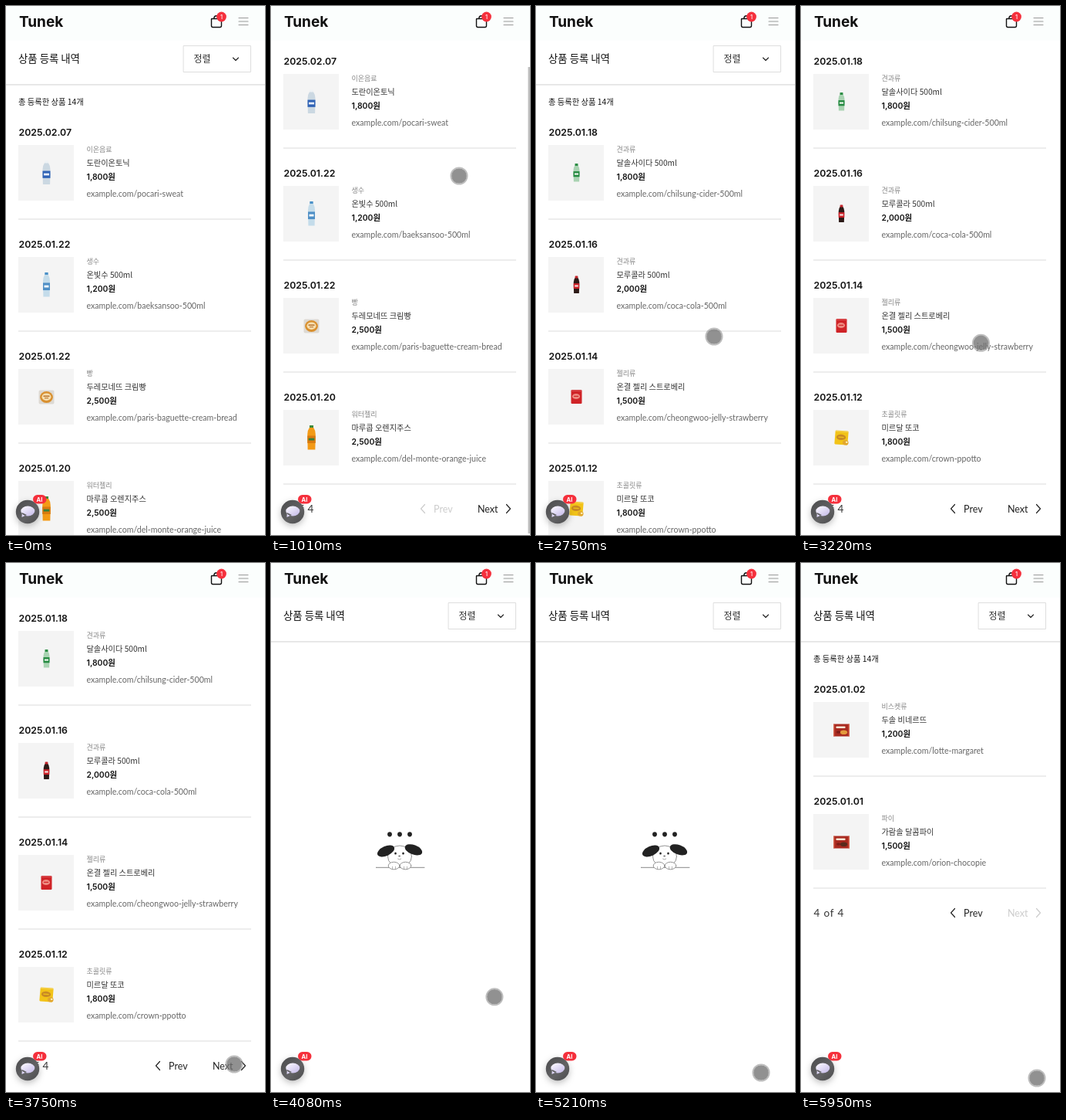
Write an HTML page with a canvas that moves like this. It is 336 by 685 pixels and loops after 6340 ms.

```html
<!DOCTYPE html>
<html lang="ko">
<head>
<meta charset="utf-8">
<title>상품 등록 내역</title>
<style>
  html, body { margin: 0; width: 336px; height: 685px; overflow: hidden; background: #fff; }
  canvas { display: block; width: 336px; height: 685px; }
</style>
</head>
<body>
<canvas id="stage"></canvas>
<script>
const W = 336, H = 685, LOOP = 6340, MAX_SCROLL = 92;
const canvas = document.getElementById('stage');
const ctx = canvas.getContext('2d');
const ratio = window.devicePixelRatio || 1;
canvas.width = W * ratio;
canvas.height = H * ratio;

const KR = '"Noto Sans CJK KR", "Noto Sans CJK", sans-serif';
const FONT = {
  ko: KR,
  num: `Inter, ${KR}`,
  latin: `Lato, ${KR}`
};

// ---------- drawing helpers ----------
function text(str, x, y, size, family, color, weight = 400, spacing = 0) {
  ctx.font = `${weight} ${size}px ${family}`;
  ctx.letterSpacing = `${spacing}px`;
  ctx.fillStyle = color;
  ctx.fillText(str, x, y);
}
function rect(x, y, w, h, color, r = 0) {
  ctx.fillStyle = color;
  ctx.beginPath();
  ctx.roundRect(x, y, w, h, r);
  ctx.fill();
}
function oval(x, y, rx, ry, fill, stroke, width = 1, turn = 0) {
  ctx.beginPath();
  ctx.ellipse(x, y, rx, ry, turn, 0, Math.PI * 2);
  if (fill) { ctx.fillStyle = fill; ctx.fill(); }
  if (stroke) { ctx.strokeStyle = stroke; ctx.lineWidth = width; ctx.stroke(); }
}
function line(points, color, width) {
  ctx.beginPath();
  points.forEach(([x, y]) => ctx.lineTo(x, y));
  ctx.strokeStyle = color;
  ctx.lineWidth = width;
  ctx.stroke();
}

// ---------- product pictures, centred on 0,0 ----------
const bottle = (w, h, cap, body, label, mark) => () => {
  const top = -h / 2, neck = w * 0.42;
  ctx.fillStyle = body;
  ctx.beginPath();
  ctx.moveTo(-neck / 2, top + 2);
  ctx.lineTo(neck / 2, top + 2);
  ctx.quadraticCurveTo(w / 2, top + h * 0.2, w / 2, top + h * 0.36);
  ctx.lineTo(w / 2 - 0.4, h / 2 - 0.5);
  ctx.lineTo(0.4 - w / 2, h / 2 - 0.5);
  ctx.lineTo(-w / 2, top + h * 0.36);
  ctx.quadraticCurveTo(-w / 2, top + h * 0.2, -neck / 2, top + 2);
  ctx.fill();
  rect(-neck / 2 - 0.3, top, neck + 0.6, 3, cap, 0.6);
  rect(-w / 2, top + h * 0.42, w, h * 0.3, label);
  rect(-w / 2 + 1.5, top + h * 0.52, w - 3, h * 0.09, mark);
};
const pack = (w, h, color, mark, tilt = 0, bite = '') => () => {
  ctx.rotate(tilt);
  rect(-w / 2, -h / 2, w, h, color, 1.2);
  rect(-w / 2 + 0.5, -h / 2 + 0.6, w - 1, 1, 'rgba(255,255,255,.3)');
  oval(-0.5, -0.5, w * 0.36, h * 0.2, mark);
  rect(-w * 0.24, -1.2, w * 0.42, 1.2, color);
  if (bite) {
    oval(w * 0.34, h * 0.33, 3.8, 3.2, bite);
    oval(w * 0.42, h * 0.3, 1.4, 1.1, '#fff2b8');
  }
};
const bun = () => {
  rect(-10, -8.5, 20, 18, '#ddd9d3', 2);
  oval(0, 0.5, 8.4, 7.6, '#d9902f');
  oval(0, 0.2, 6, 4.8, '#f6dfb0');
  rect(-4, -1.5, 8, 1.4, '#b46a22');
  rect(-2.5, 1.2, 5, 1, '#b46a22');
};
const choco = () => {
  rect(-10, -9, 20, 17, '#b98545', 1.5);
  rect(-8, -7, 16, 6, '#f3e4c4', 1);
  rect(-5, -5, 10, 1.4, '#6b4019');
  for (const x of [-5, 1, 6]) oval(x, 4.5, 3.3, 3.3, x === 1 ? '#8a5524' : '#6f411b');
};
const wafer = inner => () => {
  rect(-10.5, -7.5, 21, 16, '#a92a20', 1);
  rect(-10.5, -7.5, 1.4, 16, '#d96a52');
  rect(9.1, -7.5, 1.4, 16, '#d96a52');
  rect(-7, -4.5, 12, 2.6, '#f6e3d2', 0.8);
  oval(3, 3.2, 4.6, 2.8, inner);
  oval(-4, 3, 2.6, 1.8, '#7c1d17');
};

// ---------- listing: date, kind, name, price, address, picture ----------
const pages = [
  [
    ['2025.02.07', '이온음료', '도란이온토닉', '1,800원', 'pocari-sweat', bottle(10, 31, '#eef2f5', '#cbd8e2', '#2f62b5', '#e8eefa')],
    ['2025.01.22', '생수', '온빛수 500ml', '1,200원', 'baeksansoo-500ml', bottle(9, 32, '#4a90c8', '#c4dcea', '#4f8fc6', '#f2f8fc')],
    ['2025.01.22', '빵', '두레모네뜨 크림빵', '2,500원', 'paris-baguette-cream-bread', bun],
    ['2025.01.20', '워터젤리', '마루콥 오렌지주스', '2,500원', 'del-monte-orange-juice', bottle(10.5, 32, '#3c8a3a', '#f39a16', '#d97a10', '#35803a')]
  ],
  [
    ['2025.01.18', '견과류', '달솔사이다 500ml', '1,800원', 'chilsung-cider-500ml', bottle(8, 24, '#2d8d45', '#a9d3b2', '#258a41', '#f0f7ee')],
    ['2025.01.16', '견과류', '모루콜라 500ml', '2,000원', 'coca-cola-500ml', bottle(7.5, 23, '#c4232a', '#2c1a17', '#cc2128', '#f5e9e6')],
    ['2025.01.14', '젤리류', '온결 젤리 스트로베리', '1,500원', 'cheongwoo-jelly-strawberry', pack(14, 18, '#cf2327', '#ee8a80')],
    ['2025.01.12', '초콜릿류', '미르달 또코', '1,800원', 'crown-ppotto', pack(17, 18, '#f2c318', '#c98a24', 0.08, '#e2a72f')]
  ],
  [
    ['2025.01.10', '과자', '가람솔 바다콩', '900원', 'orion-goraebap', pack(17, 20, '#edb51c', '#3f8fc0', 0.05, '#d9a52c')],
    ['2025.01.08', '초콜릿류', '벨모나떼르', '1,200원', 'ferrero-rocher', choco],
    ['2025.01.06', '초콜릿류', '두솔 퐁쪼', '1,000원', 'lotte-kancho', pack(16, 20, '#d3224f', '#f2b9c4', -0.06, '#e9b23a')],
    ['2025.01.04', '과자', '나루 슈몽볼', '2,500원', 'haetae-homerunball', pack(16, 20, '#efbe1c', '#6f5620', -0.05, '#e0a238')]
  ],
  [
    ['2025.01.02', '비스켓류', '두솔 비네르뜨', '1,200원', 'lotte-margaret', wafer('#e39a3c')],
    ['2025.01.01', '파이', '가람솔 달콤파이', '1,500원', 'orion-chocopie', wafer('#5a2c1d')]
  ]
];

function item([date, kind, name, price, slug, art], y) {
  text(date, 16.5, y + 5, 12.3, FONT.num, '#111', 600);
  rect(16, y + 17, 72, 72, '#f4f4f4');
  ctx.save();
  ctx.translate(52.5, y + 53);
  art();
  ctx.restore();
  text(kind, 104.5, y + 26.3, 9, FONT.ko, '#888');
  text(name, 104.5, y + 44, 10.2, FONT.ko, '#333');
  text(price, 104.5, y + 62, 10.4, FONT.num, '#111', 600);
  text('example.com/' + slug, 104.5, y + 84, 10.6, FONT.latin, '#666');
  rect(16, y + 112.2, 302, 1.5, '#e7e7e7');
}

function pager(page, y) {
  const back = page > 0 ? '#222' : '#ccc';
  const next = page < 3 ? '#222' : '#ccc';
  text(`${page + 1} of 4`, 16.5, y + 4.8, 13.5, FONT.latin, '#333', 400, 0.8);
  line([[199.5, y - 5.5], [194.5, y], [199.5, y + 5.5]], back, 1.2);
  text('Prev', 211, y + 4.8, 12.5, FONT.latin, back);
  text('Next', 268, y + 4.8, 12.5, FONT.latin, next);
  line([[305.5, y - 5.5], [310.5, y], [305.5, y + 5.5]], next, 1.2);
}

function heading() {
  text('상품 등록 내역', 16, 73, 13.4, FONT.ko, '#111', 500);
  ctx.strokeStyle = '#dedede';
  ctx.lineWidth = 1;
  ctx.strokeRect(230.5, 51.5, 87, 34);
  text('정렬', 243.5, 73, 12, FONT.ko, '#333');
  line([[294.5, 67], [298, 70.5], [301.5, 67]], '#222', 1.1);
  rect(0, 101, W, 1.7, '#e4e4e4');
}

function list(page) {
  text('총 등록한 상품 14개', 16, 128, 10.3, FONT.ko, '#111', 500);
  pages[page].forEach((entry, i) => item(entry, 163 + i * 145));
  pager(page, 163 + pages[page].length * 145);
}

function puppy() {
  for (const x of [154, 167, 180]) oval(x, 351.3, 2.9, 3.1, '#222');
  line([[136, 394.3], [199, 394.3]], '#888', 1);
  oval(167, 380, 15.5, 14, '#fff', '#888', 0.9);
  oval(149, 373, 11.8, 6.2, '#222', null, 0, -0.42);
  oval(185, 371.3, 11.8, 6.2, '#222', null, 0, 0.36);
  oval(161.5, 376, 1.3, 1.6, '#222');
  oval(171.5, 376, 1.3, 1.6, '#222');
  oval(166.6, 379.5, 1.4, 0.9, '#777');
  line([[164.5, 383], [166.6, 384], [168.7, 383]], '#999', 0.8);
  for (const x of [159.5, 174.5]) {
    oval(x, 392, 7.3, 4.8, '#fff', '#888', 0.9);
    line([[x - 2, 393], [x - 2, 396]], '#999', 0.7);
    line([[x + 2, 393], [x + 2, 396]], '#999', 0.7);
  }
}

function header() {
  rect(0, 0, W, 44.5, '#fbfefd');
  text('Tunek', 17, 27, 19, FONT.num, '#111', 700);
  ctx.strokeStyle = '#111';
  ctx.lineWidth = 1.4;
  ctx.beginPath();
  ctx.roundRect(266.5, 16.5, 13, 11, [0.5, 0.5, 2, 2]);
  ctx.moveTo(269.8, 16.5);
  ctx.bezierCurveTo(269.8, 11.5, 276.2, 11.5, 276.2, 16.5);
  ctx.stroke();
  oval(279.5, 14, 6.4, 6.4, '#f5303c');
  text('1', 277.9, 16.8, 7.5, FONT.num, '#fff', 500);
  for (const y of [15.5, 20, 24.5]) line([[302, y], [314, y]], '#999', 1.1);
}

function chat() {
  const shade = ctx.createLinearGradient(16, 642, 40, 668);
  shade.addColorStop(0, '#4e4e50');
  shade.addColorStop(0.6, '#626264');
  shade.addColorStop(1, '#505052');
  ctx.save();
  ctx.shadowColor = 'rgba(0,0,0,.25)';
  ctx.shadowBlur = 8 * ratio;
  ctx.shadowOffsetY = 3 * ratio;
  oval(28, 655, 15.2, 15.2, shade);
  ctx.restore();
  const glow = ctx.createLinearGradient(24, 648, 32, 661);
  glow.addColorStop(0, '#f7f4ff');
  glow.addColorStop(1, '#c9bfea');
  ctx.fillStyle = glow;
  ctx.beginPath();
  ctx.ellipse(28.3, 654, 9, 6.4, 0, 0, Math.PI * 2);
  ctx.moveTo(20.8, 656);
  ctx.lineTo(20.5, 662);
  ctx.lineTo(27, 659);
  ctx.fill();
  rect(35, 633, 17.5, 11.5, '#f5303c', 5.7);
  text('AI', 39.6, 641.5, 7.6, FONT.num, '#fff', 700);
}

// ---------- motion ----------
// Bursts of change: start, end, number of steps
const bursts = [
  [830, 1010, 3], [1300, 1680, 6], [1880, 2290, 6], [2440, 2750, 5], [2820, 3020, 3],
  [3220, 3750, 9], [3810, 3810, 1], [3890, 4340, 7], [4410, 4480, 2], [4540, 4870, 6],
  [5070, 5210, 3], [5270, 5470, 4], [5680, 5950, 5]
];
const ticks = bursts.flatMap(([a, b, n]) =>
  Array.from({ length: n }, (_, i) => a + (b - a) * i / Math.max(1, n - 1)));

const pointerKeys = [
  [830, 258, 165], [1010, 244, 220], [1230, 244, 220], [1680, 282, 604], [1810, 282, 604],
  [2290, 295, 650], [2370, 295, 650], [2750, 231, 428], [3150, 231, 428], [3750, 296, 649],
  [3810, 301, 650], [3830, 301, 650], [4340, 271, 411], [4470, 271, 411], [4870, 291, 650],
  [5000, 291, 650], [5210, 292, 660], [5610, 292, 660], [5950, 306, 667]
];
const scrollKeys = [
  [760, 0], [1010, MAX_SCROLL], [2439, MAX_SCROLL], [2440, 0], [2750, 0], [3020, MAX_SCROLL],
  [3889, MAX_SCROLL], [3890, 0], [4115, 0], [4340, MAX_SCROLL], [5069, MAX_SCROLL], [5070, 0]
];
const barKeys = [
  [829, 0], [830, 1], [1230, 1], [1480, 0], [4115, 0], [4190, 1], [4480, 1], [4720, 0]
];
const turns = [2440, 3890, 5070];
const loads = [[2440, 2640], [3890, 4080], [5070, 5380]];

function track(keys, t) {
  const i = keys.findIndex(k => k[0] > t);
  if (i === 0) return keys[0].slice(1);
  if (i < 0) return keys[keys.length - 1].slice(1);
  const a = keys[i - 1], b = keys[i];
  const p = (t - a[0]) / (b[0] - a[0]);
  const e = p * p * (3 - 2 * p);
  return a.slice(1).map((v, j) => v + (b[j + 1] - v) * e);
}

function pointer(t) {
  if (t < 830) return;
  const [x, y] = track(pointerKeys, t);
  oval(x, y, 9.8, 9.8, 'rgba(112,112,112,.77)');
  oval(x, y, 10.6, 10.6, null, 'rgba(150,150,150,.62)', 1.9);
}

function draw(now) {
  const t = ticks.reduce((last, tick) => tick <= now ? tick : last, 0);
  const page = turns.filter(turn => t >= turn).length;
  const loading = loads.some(([a, b]) => t >= a && t < b);
  const [scroll] = track(scrollKeys, t);
  const [bar] = track(barKeys, t);

  ctx.setTransform(ratio, 0, 0, ratio, 0, 0);
  ctx.lineCap = ctx.lineJoin = 'round';
  rect(0, 0, W, H, '#fff');
  ctx.save();
  ctx.translate(0, -scroll);
  heading();
  if (loading) puppy();
  else list(page);
  ctx.restore();
  header();
  chat();
  if (bar > 0) {
    ctx.globalAlpha = bar;
    rect(333.5, 2 + scroll * 77 / MAX_SCROLL, 2.5, 604, '#bdbdbd');
    ctx.globalAlpha = 1;
  }
  pointer(t);
}

const start = performance.now();
function loop() {
  draw((performance.now() - start) % LOOP);
  requestAnimationFrame(loop);
}
loop();
</script>
</body>
</html>
```
